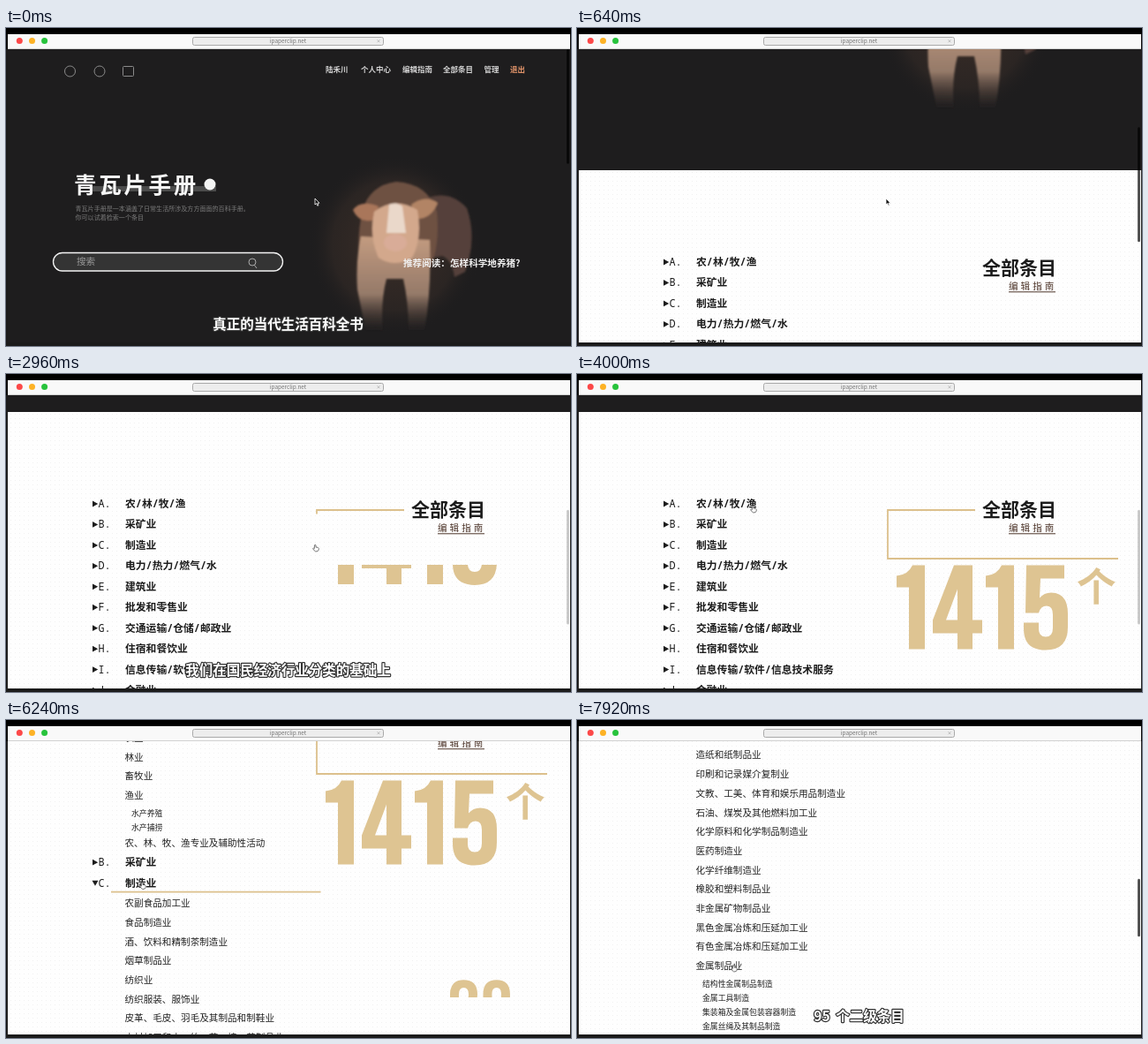
These frames come from a looping animation (640x360 px, 8 s). An HTML page:

```html
<!DOCTYPE html>
<html lang="zh-CN">
<head>
<meta charset="utf-8">
<title>百科手册</title>
<style>
html, body { margin: 0; width: 100%; height: 100%; overflow: hidden; background: #000; }
svg { display: block; width: 640px; height: 360px; }
text { font-family: 'Noto Sans CJK SC', 'Noto Sans CJK', 'Noto Sans', sans-serif; white-space: pre; }
.mono { font-family: 'Noto Sans Mono', 'Noto Sans CJK SC', 'Noto Sans CJK', monospace; }
.sub { paint-order: stroke; stroke: #333; stroke-width: 2.3px; stroke-linejoin: round; word-spacing: 3px; }
</style>
</head>
<body>
<svg viewBox="0 0 640 360" lang="zh-CN">
  <defs>
    <clipPath id="view"><rect x="2" y="24" width="637" height="332"/></clipPath>
    <clipPath id="below"><rect x="340" y="216" width="290" height="120"/></clipPath>
    <clipPath id="above"><rect x="418" y="240" width="200" height="74"/></clipPath>
    <pattern id="dots" width="5" height="5" patternUnits="userSpaceOnUse">
      <rect width="5" height="5" fill="#fefefe"/><rect width="1" height="1" fill="#f1f1f1"/>
    </pattern>
    <radialGradient id="glow">
      <stop offset="0" stop-color="#3a2d27"/><stop offset=".72" stop-color="#2b2523"/>
      <stop offset="1" stop-color="#1e1d1e" stop-opacity="0"/>
    </radialGradient>
    <linearGradient id="leg" x1="0" y1="0" x2="0" y2="1">
      <stop offset="0" stop-color="#c39b80"/><stop offset=".6" stop-color="#957a69"/>
      <stop offset="1" stop-color="#3a302c" stop-opacity="0"/>
    </linearGradient>
    <filter id="soft" x="-10%" y="-10%" width="120%" height="120%"><feGaussianBlur stdDeviation="1"/></filter>
  </defs>

  <rect width="640" height="360" fill="#000"/>
  <rect y="24" width="640" height="336" fill="#1b1b1b"/>

  <g clip-path="url(#view)">
    <g id="page">
      <rect y="-10" width="640" height="423" fill="#1e1d1e"/>
      <rect y="413" width="640" height="1700" fill="url(#dots)"/>
      <g id="hero">
        <ellipse cx="440" cy="246" rx="98" ry="102" fill="url(#glow)"/>
        <g filter="url(#soft)">
          <path d="M470 196Q500 180 522 204Q534 238 520 276L508 282Q505 262 494 258L474 262Z" fill="#55403a"/>
          <path d="M404 206Q412 178 442 174Q478 176 488 208Q492 250 478 276H402Q396 240 404 206Z" fill="#6e5143"/>
          <path d="M402 236Q396 262 398 296L408 345H427Q424 310 431 284H450Q456 310 456 342H474Q482 300 480 240Z" fill="url(#leg)"/>
          <path d="M422 202Q402 194 393 206Q400 222 417 217Z" fill="#a9765a"/>
          <path d="M459 200Q475 188 489 198Q482 216 465 216Z" fill="#b28465"/>
          <path d="M417 208Q440 190 466 206Q472 238 460 260Q440 272 422 260Q411 236 417 208Z" fill="#d3a88c"/>
          <path d="M434 200Q442 196 449 202L453 232H431Z" fill="#ead8ca"/>
          <ellipse cx="441" cy="243" rx="13" ry="10" fill="#d9ac98"/>
        </g>
        <g fill="none" stroke="#8b8b8b">
          <circle cx="72.5" cy="49" r="6"/><circle cx="106" cy="49" r="6"/>
          <rect x="132.5" y="43.5" width="12" height="11" rx="1"/>
        </g>
        <rect x="98" y="179" width="140" height="6" fill="#4b4b4b"/>
        <circle cx="231" cy="177" r="6.5" fill="#f4f4f4"/>
        <rect x="53.5" y="254.5" width="260" height="20.5" rx="10.2" fill="#343434" stroke="#f4f4f4" stroke-width="1.3"/>
        <path d="M283 265a4 4 0 1 1-8 0a4 4 0 1 1 8 0M281.4 268.4l2.6 3.6" fill="none" stroke="#aaa"/>
      </g>
      <g id="list"></g>
      <g id="total" transform="translate(0 370)">
        <path id="line1" pathLength="1" stroke-dasharray="1 2" d="M451 154H352V209H613" fill="none" stroke="#dcc08c" stroke-width="1.8"/>
        <g clip-path="url(#below)"><g id="num1"></g></g>
      </g>
      <g transform="translate(0 518)">
        <path id="line2" pathLength="1" stroke-dasharray="1 2" d="M119 194.7H415V315H607" fill="none" stroke="#dcc08c" stroke-width="1.8"/>
        <g clip-path="url(#above)"><g id="num2"></g></g>
      </g>
    </g>
    <rect id="thumb" x="635" width="3" rx="1.5" fill="#000" fill-opacity=".68"/>
  </g>

  <g id="bar">
    <rect x="2" y="7" width="637" height="17" fill="#f9f9f9"/>
    <rect x="2" y="23" width="637" height="1" fill="#d2d2d2"/>
    <circle cx="15.3" cy="14.6" r="3.5" fill="#fc4848"/>
    <circle cx="29.5" cy="14.6" r="3.5" fill="#fdb225"/>
    <circle cx="43.6" cy="14.6" r="3.5" fill="#27c33c"/>
    <rect x="211.5" y="10.5" width="216" height="9" rx="2" fill="#ededed" stroke="#a9a9a9"/>
    <path d="M420.5 13.3l3 3m0-3l-3 3" stroke="#aaa" stroke-width=".7"/>
  </g>

  <g id="cursor" stroke-linejoin="round">
    <path id="arrow" d="M-1-4V3L.6 1.6L1.8 4.2L3 3.7L1.8 1.2H4Z" fill="#111" stroke="#fff" stroke-width=".8"/>
    <path id="hand" d="M-1.6 .6V-3.2Q-.8-4.2 0-3.2V-.9Q2.9-1.1 3.2 .3V2Q3 4-.2 4Q-1.8 3.4-3.4 .6Q-2.8-.4-1.6 .6Z" fill="#fff" stroke="#555" stroke-width=".8"/>
  </g>
  <g id="caption"></g>
</svg>
<script>
const $ = id => document.getElementById(id);
const NS = 'http://www.w3.org/2000/svg';
const TAN = '#dec492';

function add(parent, tag, attrs) {
  const el = document.createElementNS(NS, tag);
  for (const k in attrs) el.setAttribute(k, attrs[k]);
  parent.appendChild(el);
  return el;
}
// y is the middle of the line
function label(parent, str, x, y, size, fill, more) {
  const el = add(parent, 'text', { x, y: y + size * 0.33, 'font-size': size, fill, ...more });
  el.textContent = str;
  return el;
}
const bold = { 'font-weight': 700 };

// Opening screen
const hero = $('hero');
[['陆禾川', 362], ['个人中心', 402], ['编辑指南', 449], ['全部条目', 495], ['管理', 541.5], ['退出', 571]]
  .forEach(([s, x]) => label(hero, s, x, 47.5, 8.5, s === '退出' ? '#e2946a' : '#d4d4d4', bold));
label(hero, '青瓦片手册', 77, 179, 25.5, '#f6f6f6', { 'font-weight': 900, 'letter-spacing': 2.7 });
label(hero, '青瓦片手册是一本涵盖了日常生活所涉及方方面面的百科手册。', 78.5, 205, 7.05, '#7b7b7b');
label(hero, '你可以试着检索一个条目', 78.5, 214.8, 7.05, '#7b7b7b');
label(hero, '搜索', 80, 265, 10.6, '#9a9a9a');
label(hero, '推荐阅读：怎样科学地养猪?', 450, 266.8, 10.6, '#f0f0f0', bold);
label($('bar'), 'ipaperclip.net', 319.5, 14.8, 6.4, '#777', { 'text-anchor': 'middle' });

// Right column
const total = $('total');
label(total, '全部条目', 459, 154, 21, '#1c1c1c', bold);
label(total, '编辑指南', 489, 175, 10.6, '#4d352a', { 'letter-spacing': 3 });
add(total, 'rect', { x: 489, y: 180.3, width: 53, height: 1, fill: '#4d352a' });

const digits = {
  0: 'M0 27Q0 0 26 0Q52 0 52 27V69Q52 96 26 96Q0 96 0 69ZM17 27V69Q17 81 26 81Q35 81 35 69V27Q35 15 26 15Q17 15 17 27Z',
  1: 'M18 0H32V95H14V25H0V12Q13 11 18 0Z',
  2: 'M0 28Q0 0 26 0Q53 0 53 28Q53 42 43 55L21 80H53V95H0V81L28 48Q36 38 36 28Q36 15 26.5 15Q17 15 17 28V35H0Z',
  4: 'M24 0H45V62H56V77H45V95H28V77H0V62ZM28 62V27L15 62Z',
  5: 'M3 0H46V15H19L18 37Q23 31 31 31Q50 31 50 55V70Q50 96 25 96Q0 96 0 72V65H17V72Q17 81 25 81Q33 81 33 71V56Q33 46 26 46Q19 46 17 54H2Z'
};
function digit(parent, n, x, y, scale) {
  add(parent, 'path', { d: digits[n], fill: TAN, 'fill-rule': 'evenodd', transform: `translate(${x} ${y}) scale(${scale})` });
}
const num1 = $('num1'), num2 = $('num2');
[[1, 362], [4, 403], [1, 463], [5, 506]].forEach(([n, x]) => digit(num1, n, x, 216.5, 1));
label(num1, '个', 566, 242.5, 44.5, TAN, bold);
digit(num2, 2, 503, 254, 0.585);
digit(num2, 0, 540.5, 254, 0.585);
label(num2, '个', 576, 296, 26, TAN, bold);
label(num2, '一级条目', 422.5, 302, 16.8, '#1c1c1c', { ...bold, 'letter-spacing': 2 });

// Outline: a leading '-' marks the third level
const heads = ['农/林/牧/渔', '采矿业', '制造业', '电力/热力/燃气/水', '建筑业', '批发和零售业', '交通运输/仓储/邮政业',
  '住宿和餐饮业', '信息传输/软件/信息技术服务', '金融业', '房地产业', '教育'];
const kids = {
  0: '农业 林业 畜牧业 渔业 -水产养殖 -水产捕捞 农、林、牧、渔专业及辅助性活动',
  2: '农副食品加工业 食品制造业 酒、饮料和精制茶制造业 烟草制品业 纺织业 纺织服装、服饰业 皮革、毛皮、羽毛及其制品和制鞋业 ' +
     '木材加工和木、竹、藤、棕、草制品业 家具制造业 造纸和纸制品业 印刷和记录媒介复制业 文教、工美、体育和娱乐用品制造业 ' +
     '石油、煤炭及其他燃料加工业 化学原料和化学制品制造业 医药制造业 化学纤维制造业 橡胶和塑料制品业 非金属矿物制品业 ' +
     '黑色金属冶炼和压延加工业 有色金属冶炼和压延加工业 金属制品业 -结构性金属制品制造 -金属工具制造 ' +
     '-集装箱及金属包装容器制造 -金属丝绳及其制品制造 -建筑、安全用金属制品制造 通用设备制造业'
};
const openAt = { 0: 4480, 2: 5760 }, metalAt = 7840;
const rows = [];
heads.forEach((name, i) => {
  const g = add($('list'), 'g', {});
  const mark = add(g, 'path', { fill: '#1c1c1c' });
  const mono = { ...bold, class: 'mono' };
  label(g, String.fromCharCode(65 + i) + '.', 104.5, 0, 11.8, '#1c1c1c', { ...mono, 'font-weight': 500 });
  label(g, name, 135, 0, 11.8, '#1c1c1c', mono);
  rows.push({ g, mark, level: 0, from: 0, opens: openAt[i] || Infinity });
  (kids[i] ? kids[i].split(' ') : []).forEach(s => {
    const deep = s[0] === '-';
    const kg = add($('list'), 'g', {});
    label(kg, deep ? s.slice(1) : s, deep ? 142 : 134.5, 0, deep ? 8.85 : 10.6, '#222');
    rows.push({ g: kg, level: deep ? 2 : 1, from: deep && i === 2 ? metalAt : openAt[i], head: i });
  });
});
// Row spacing by level of the upper and the lower row
const gaps = [[23.45, 21.3, 0], [22, 21.7, 20.4], [22, 17.4, 16]];

function layout(t) {
  let y = 517, prev = null;
  for (const r of rows) {
    const on = t >= r.from;
    show(r.g, on);
    if (!on) continue;
    if (prev) y += gaps[prev.level][r.level] + (prev.level === 0 && r.head === 2 ? 1.7 : 0);
    r.g.setAttribute('transform', `translate(0 ${y})`);
    if (r.mark) r.mark.setAttribute('d', t >= r.opens ? 'M97.5-3H104.5L101 3.2Z' : 'M98-3.4V3.4L104.2 0Z');
    prev = r;
  }
}

// Smooth monotone curve through [time, value] points
function track(pts, t) {
  const n = pts.length - 1;
  if (t <= pts[0][0]) return pts[0][1];
  if (t >= pts[n][0]) return pts[n][1];
  const slope = i => (pts[i + 1][1] - pts[i][1]) / (pts[i + 1][0] - pts[i][0]);
  const tangent = i => {
    if (i === 0 || i === n) return 0;
    const a = slope(i - 1), b = slope(i);
    return a * b > 0 ? 2 * a * b / (a + b) : 0;
  };
  let i = 0;
  while (t >= pts[i + 1][0]) i++;
  const d = pts[i + 1][0] - pts[i][0], u = (t - pts[i][0]) / d, v = 1 - u;
  return pts[i][1] * (1 + 2 * u) * v * v + pts[i + 1][1] * u * u * (3 - 2 * u)
    + d * u * v * (tangent(i) * v - tangent(i + 1) * u);
}
const scroll = [[100, 0], [400, 82], [640, 252], [800, 324], [960, 358], [1200, 370],
  [4980, 370], [5320, 518], [7220, 518], [7760, 881]];
const curX = [[3340, 351], [3960, 200], [5000, 200], [5320, 152], [5440, 152], [5680, 155], [7240, 155], [7760, 178]];
const curY = [[3340, 197], [3960, 153], [5000, 153], [5320, 235], [5440, 235], [5680, 187.5], [7240, 187.5], [7760, 281]];
const thumbFade = [[1300, 1], [2300, 0.3], [4980, 0.3], [5080, 1], [5500, 1], [5840, 0], [7220, 0], [7320, 1]];

function ease(t, a, b) {
  const u = Math.min(1, Math.max(0, (t - a) / (b - a)));
  return u < 0.5 ? 2 * u * u : 1 - 2 * (1 - u) * (1 - u);
}

const captions = [['真正的当代生活百科全书', 0, 400], ['我们在国民经济行业分类的基础上', 800, 3280],
  ['并分为 20 个一级条目', 6800, 7600], ['95 个二级条目', 7600, 8000]]
  .map(([s, a, b]) => ({ a, b, el: label($('caption'), s, 319.5, 335.8, 15.5, '#fff', { 'font-weight': 900, class: 'sub', 'text-anchor': 'middle' }) }));

function show(el, on) { el.setAttribute('display', on ? 'inline' : 'none'); }

function reveal(line, group, p, shift) {
  line.setAttribute('stroke-dashoffset', 1 - p);
  show(line, p > 0);
  show(group, p > 0);
  group.setAttribute('transform', `translate(0 ${shift * (1 - p)})`);
}

function draw(t) {
  const s = track(scroll, t);
  $('page').setAttribute('transform', `translate(0 ${-s})`);
  layout(t);

  const height = 986 + (t >= openAt[0] ? 138 : 0) + (t >= openAt[2] ? 650 : 0) + (t >= metalAt ? 180 : 0);
  const h = 128000 / height, thumb = $('thumb');
  thumb.setAttribute('y', 24 + s * h * 0.0027);
  thumb.setAttribute('height', h);
  thumb.setAttribute('opacity', track(thumbFade, t));

  reveal($('line1'), num1, ease(t, 2480, 3840), -98);
  reveal($('line2'), num2, ease(t, 5860, 6720), 66);

  $('cursor').setAttribute('transform', `translate(${track(curX, t)} ${track(curY, t)})`);
  show($('arrow'), t < 2640);
  show($('hand'), t >= 2640);
  captions.forEach(c => show(c.el, t >= c.a && t < c.b));
}

const start = performance.now(), STEP = 80;
function tick() {
  const t = (performance.now() - start) % 8000;
  draw(Math.floor(t / STEP) * STEP);
  requestAnimationFrame(tick);
}
draw(0);
requestAnimationFrame(tick);
</script>
</body>
</html>
```
